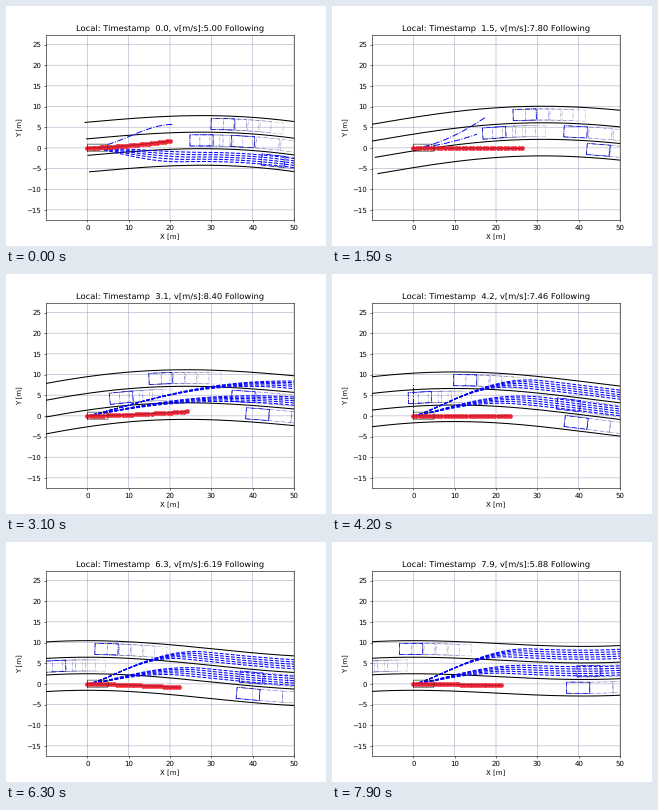
Recreate the animation shown at these times as a matplotlib script. Size 320x240 px, loop 8000 ms.

```python
import numpy as np
import matplotlib.pyplot as plt
from matplotlib.animation import FuncAnimation

FRAMES, INTERVAL = 80, 100
LANE = 4
CAR_LEN, CAR_WID = 5.6, 2.7

plt.rcParams["text.hinting"] = "none"

speed = np.poly1d(np.polyfit([0, 1.5, 3.1, 4.2, 5.4, 6.3, 7.9],
                             [5, 7.8, 8.4, 7.46, 6.57, 6.19, 5.88], 6))
travelled = speed.integ()

# Cars: start station, lane offset, speed, half acceleration, prediction gap
CARS = [
    (29.9, LANE, 2.8, 0, 2.9),
    (24.9, 0, 1.0, 0.095, 2.4),
    (34.9, 0, 7.6, 0, 6.0),
    (42.7, -LANE, 6.3, 0, 5.5),
]


def heading(s):
    """Direction of the road at station s."""
    return -0.15 * (1 - np.cos(s / 24.2))


DS = 0.25
S = np.arange(0, 140, DS)
ROAD_X = np.cumsum(np.cos(heading(S))) * DS
ROAD_Y = np.cumsum(np.sin(heading(S))) * DS


def smooth(u):
    u = np.clip(u, 0, 1)
    return u * u * (3 - 2 * u)


def lane_point(s, offset):
    h = heading(s)
    return (np.interp(s, S, ROAD_X) - offset * np.sin(h),
            np.interp(s, S, ROAD_Y) + offset * np.cos(h))


def drift(s):
    """Sideways position of the vehicle while it moves one lane right."""
    return -4.45 * smooth((s + 5) / 41)


class View:
    """World seen from the moving vehicle at time t."""

    def __init__(self, t):
        self.s = travelled(t)
        self.x, self.y = lane_point(self.s, drift(self.s))
        turn = (drift(self.s + 0.1) - drift(self.s - 0.1)) / 0.2
        self.yaw = heading(self.s) + turn - 0.02 * np.exp(-t / 2)

    def lane(self, s, offset):
        x, y = lane_point(s, offset)
        dx, dy = x - self.x, y - self.y
        c, si = np.cos(self.yaw), np.sin(self.yaw)
        return c * dx + si * dy, c * dy - si * dx

    def stations(self):
        return np.linspace(max(0, self.s - 14), self.s + 56, 140)

    def height(self, x, offset):
        return np.interp(x, *self.lane(self.stations(), offset))


fig = plt.figure(figsize=(6.4, 4.8), dpi=50)
ax = fig.add_subplot()
ax.set(xlim=(-10, 50), ylim=(-17.35, 27.35), xlabel="X [m]", ylabel="Y [m]",
       xticks=range(0, 51, 10), yticks=range(-15, 26, 5))
ax.grid(True, color="#a8a8c4", snap=False)
title = ax.set_title("")


def box(cx, cy, angle, length, width, fmt, **style):
    x = np.array([-1, 1, 1, -1, -1]) * length / 2
    y = np.array([-1, -1, 1, 1, -1]) * width / 2
    c, s = np.cos(angle), np.sin(angle)
    ax.plot(cx + c * x - s * y, cy + s * x + c * y, fmt, snap=False, **style)


def draw_road(view):
    for k in (1.5, 0.5, -0.5, -1.5):
        ax.plot(*view.lane(view.stations(), k * LANE), "k-", lw=1.5)


def draw_cars(view, t):
    for start, offset, v, a, gap in CARS:
        s0 = start + v * t + a * t * t + CAR_LEN / 2
        for k in range(4, -1, -1):
            s = s0 + k * gap
            shape = (*view.lane(s, offset), heading(s) - view.yaw,
                     CAR_LEN, CAR_WID)
            if k:
                color = "#2020c0" if k % 2 else "#404050"
                box(*shape, "-.", color=color, lw=0.9, alpha=0.75 - 0.1 * k)
            else:
                box(*shape, "k-", lw=0.7, alpha=0.6)
                box(*shape, "b-.", lw=1.1)


def draw_fan(view, t, target):
    """Bundle of lane-change candidates ending around one lane."""
    x = np.linspace(0, 54, 120)
    centre = view.height(x, 0)
    length = 26 + 28 * max(0, speed(t) - 7.4)
    for d in np.linspace(-1.1, 1.1, 5):
        u = smooth((x / (length * (1 + 0.1 * d))) ** 0.75)
        y = centre - centre[0] + (target + d + centre[0]) * u
        ax.plot(x, y, "b--", lw=1.5)


def draw_candidates(view, t):
    if t < 2.5:
        u = np.linspace(0, 1, 40)
        mix = min(t / 1.5, 1)
        rise = (1 - mix) * smooth(u) + mix * u**1.6
        for k in range(1 if t < 0.8 else 2):
            x = 20.6 - 2 * t - 2.2 * k
            ax.plot(x * u, view.height(x, LANE * (1 - k)) * rise, "b-.", lw=1.4)
    if t < 0.8:
        draw_fan(view, t, -LANE)
    if t >= 2.5:
        draw_fan(view, t, LANE)
        draw_fan(view, t, 0)
    if 3.6 <= t < 5.8:
        ax.plot([0, 0], [0, 8], "b-.", lw=1.5)


def draw_plan(view, t):
    end = np.interp(t, [0, 1.5, 3.1, 7.9], [20, 26.4, 24.1, 21.1])
    u = np.linspace(0, 1, 32)
    x = end * u
    y = view.height(end, 0 if t < 0.8 else -LANE - 0.1) * u**1.5
    ax.plot(x, y, "o", color="#f02838", ms=5.7)
    ax.plot(x, y, "-", color="#a81828", lw=1.2)
    box(2.5, 0.05, 0, 5, 1.7, "-", color="#203020", lw=0.9)


def update(i):
    for line in list(ax.lines):
        line.remove()
    t = i * INTERVAL / 1000
    view = View(t)
    draw_road(view)
    draw_cars(view, t)
    draw_candidates(view, t)
    draw_plan(view, t)
    title.set_text(f"Local: Timestamp {t:4.1f}, v[m/s]:{speed(t):.2f} Following")
    return ax.lines


anim = FuncAnimation(fig, update, frames=FRAMES, interval=INTERVAL,
                     repeat=True, repeat_delay=0, blit=False)
plt.show()
```
